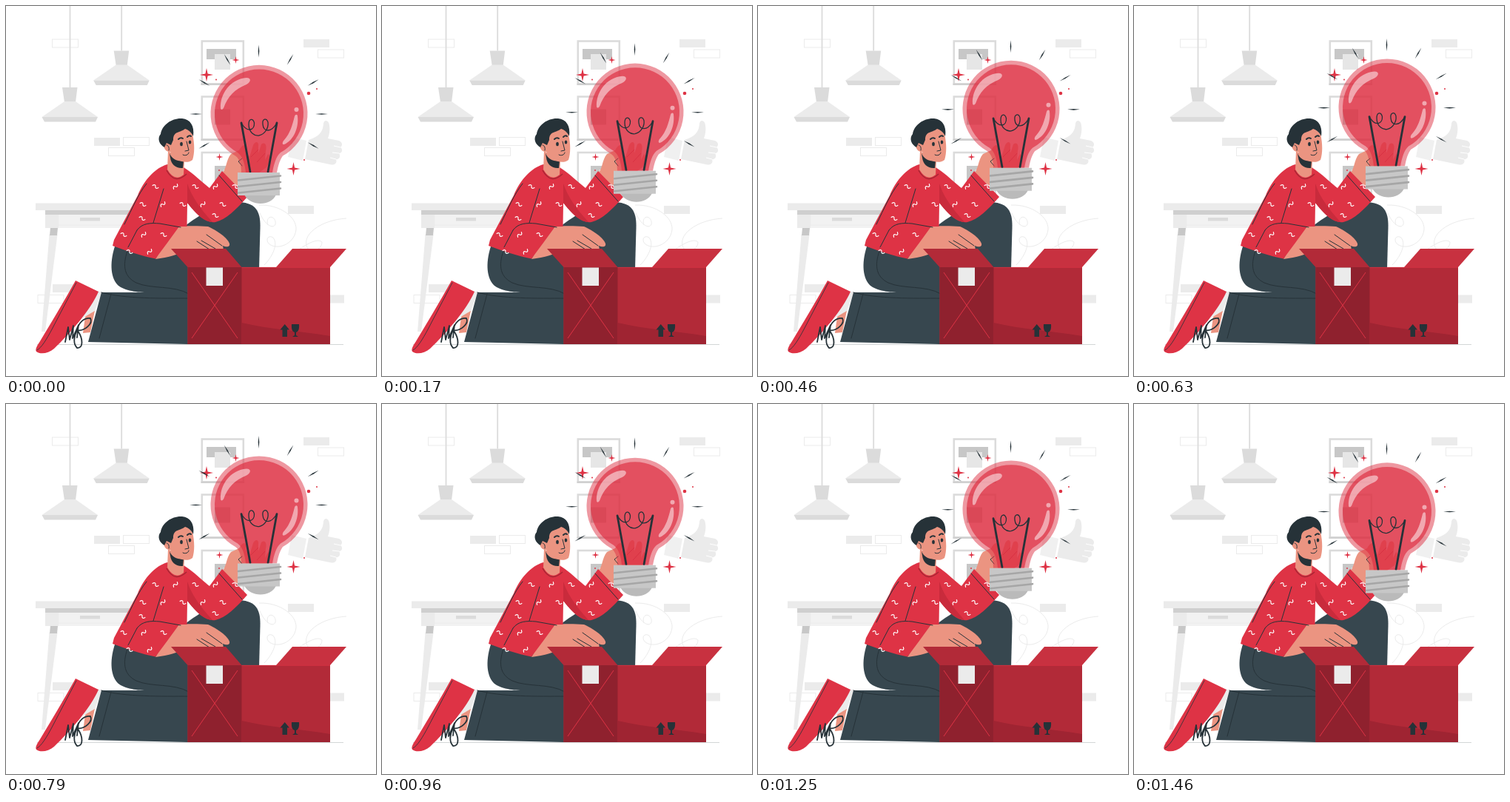
An HTML page that plays this animation: 500x500 px, repeating every 1.5 s.

```html
<!DOCTYPE html>
<html lang="en">
<head>
<meta charset="utf-8">
<title>Idea out of the box</title>
<style>
  html, body { margin: 0; width: 100%; height: 100%; overflow: hidden; background: #fff; }
  svg { display: block; width: 100%; height: 100%; }
  .line { fill: none; stroke: #263238; stroke-linecap: round; stroke-linejoin: round; }
  .ink { fill: #263238; }
  .red { fill: #de3345; }
  .skin { fill: #eb9481; }
  .pants { fill: #37474f; }
  .pale { fill: #ebebeb; }
  .grey { fill: #dbdbdb; }
  .faint { fill: none; stroke: #ebebeb; }
</style>
</head>
<body>
<svg viewBox="0 0 500 500">
  <defs>
    <g id="lamp">
      <path d="M86.500-60V110" stroke="#dbdbdb" stroke-width="1.800"/>
      <path class="grey" d="M76 110H96.500L94 130H79Z"/>
      <path class="pale" d="M79 129H94L124 150H48.500Z"/>
      <path class="grey" d="M48.500 150H124L121 156.500H52Z"/>
    </g>
    <g id="frame">
      <rect x="264.800" y="47.500" width="56" height="58" fill="#fff" stroke="#dbdbdb" stroke-width="2.600"/>
      <path d="M263.500 105.800H322" stroke="#d0d0d0" stroke-width="2.600"/>
    </g>
    <rect id="brick" width="35" height="11"/>
    <path id="star" class="red" d="M0-9L1.600-1.600L9 0L1.600 1.600L0 9L-1.600 1.600L-9 0L-1.600-1.600Z"/>
    <path id="squiggle" fill="none" stroke="#fff" stroke-width="1.200" stroke-linecap="round" d="M-4 1C-3-2-1-2 0 0S3 2 4-1"/>
    <path id="ray" class="ink" d="M0-8.500L.8 0L0 8.500L-.8 0Z"/>
  </defs>

  <!-- Room -->
  <g class="pale">
    <use href="#brick" x="402" y="45"/>
    <use href="#brick" x="119" y="178"/>
    <use href="#brick" x="381" y="270"/>
    <use href="#brick" x="63" y="376"/>
    <use href="#brick" x="422" y="390.500"/>
  </g>
  <g class="faint">
    <use href="#brick" x="62.500" y="45"/>
    <use href="#brick" x="421.500" y="59"/>
    <use href="#brick" x="158.500" y="177.500"/>
    <use href="#brick" x="138.500" y="191.500"/>
    <use href="#brick" x="43" y="390.500"/>
    <path d="M342 269C370 268 393 285 392 302C390 322 366 331 355 321C350 315 355 309 361 313C369 323 358 341 349 350M343 280C353 302 366 301 364 291C361 281 350 285 354 296M460 287C425 289 397 310 408 328C416 334 427 328 427 319C420 312 398 325 374 347"/>
  </g>
  <use href="#lamp"/>
  <use href="#lamp" x="69.700" y="-49.500"/>

  <use href="#frame"/>
  <use href="#frame" y="75"/>
  <use href="#frame" y="150.500"/>
  <path fill="#c7c7c7" d="M271 58H311V72H271ZM282 139.500H303V160.500H282ZM282 216H306V240H282Z"/>
  <path fill="#e6e6e6" d="M282 65H303V86H282ZM294 221H315V240H294Z"/>

  <path fill="#f0f0f0" d="M386 177L406 182L401 209L381 204Z"/>
  <path class="pale" d="M409 181C420 177 428 173 429 159C430 153 436 154 437 161C438 168 437 173 435 179L450 182C455 184 455 189 452 191C456 194 454 199 450 199C453 203 450 208 446 207C448 212 444 215 440 214.500L404 207Z"/>
  <path fill="none" stroke="#fff" d="M443 189L452 191M441 198L450 199M438 205L446 207"/>

  <path class="pale" d="M58.500 309H69.500L53 440H48Z"/>
  <path fill="#f2f2f2" d="M53 282H180V300H53Z"/>
  <path class="pale" d="M40 266.500H190V276H40ZM53 282H71V300H53Z"/>
  <path fill="#cfcfcf" d="M53 276H190V282H53Z"/>
  <path class="grey" d="M100 286H127V290.500H100Z"/>
  <path class="faint" d="M71 282V296H180"/>
  <path fill="#c7c7c7" d="M60 300H70L69 310H59Z"/>
  <path d="M42 457.300H456" stroke="#263238" stroke-width=".5" opacity=".5"/>

  <!-- Legs and shoe -->
  <path class="pants" d="M232 305C262 281 292 262 320 265.500C340 268 344 281 343.500 300L342 356H235Z"/>
  <path class="skin" d="M122 402L114 441L104 442L107 420Z"/>
  <path class="pale" d="M124 385L130 387L120 412L103 422Z"/>
  <path class="red" d="M94 371L125 386C114 411 88 441 65 463C57 470 46 471 41 467C39 464 42 459 46 453C61 428 78 400 94 371Z"/>
  <path class="line" stroke-width=".8" d="M42 465C48 462 55 450 62 437L95 374"/>
  <path class="line" stroke-width="1.800" d="M80 454L84 434L86 451L91 432L90 449L98 431L96 448M96 439C98 427 106 421 114 422C118 429 106 440 96 438C91 447 91 457 96 462C105 463 104 449 97 439"/>
  <path class="pants" d="M148 322C140 345 141 365 150 376C157 384 175 387 190 387H129L111 454L246 457V320Z"/>
  <path class="line" d="M164 331C157 352 160 366 176 374C196 383 227 377 247 389M129 387C160 396 212 395 247 395M142 389L126 449"/>

  <!-- Resting hand -->
  <path class="skin" d="M228 298C246 297 261 297 273 298C285 303 300 314 302 321C303 326 298 326 293 324L294 330H246C233 335 220 340 202 342Z"/>
  <path class="line" d="M258 318L275 329M264 317L283 328M271 309L292 324"/>

  <!-- Raised hand -->
  <path class="skin" d="M290 228C298 223 297 208 304 200L315 195C320 185 326 186 324 197L329 204L334 188C337 182 342 183 341 190L341 199L345 187C350 183 353 188 351 196L350 208L354 200C358 202 356 211 352 218L338 228L318 246Z"/>
  <path class="line" stroke-width=".9" d="M319 206L314 210L319 216"/>
  <path fill="none" stroke="#b22a38" d="M331 204L341 194M339 211L350 199"/>

  <!-- Sweater -->
  <path class="red" d="M218 214C201 219 186 236 178 256L146 316L144 324C160 330 184 338 202 341.500C212 328 224 312 234 298L244.500 298L245 266C256 279 268 294 283 292C297 289 312 274 326 258L292 223L275 246C266 239 253 226 240 218Z"/>
  <path fill="#c92b3c" d="M245 240C251 258 262 273 279 292C265 291 254 277 245 266Z"/>
  <path class="line" d="M213 247L199 293M177 303C184 293 196 293 208 294L236 299M190 240C178 255 171 273 160 295M177 303L165 326M288 229L319 264"/>
  <path class="skin" d="M219 196L218 221Q228 238 240 228L241 209Z"/>
  <path fill="none" stroke="#a82633" stroke-width="1.500" d="M217 222Q228 242 244 227"/>
  <g id="pattern"></g>

  <!-- Head -->
  <path class="ink" d="M221 199C224 207 233 211 240 209L239 219C230 220 223 214 222 205Z"/>
  <path class="skin" d="M215 185C214 169 225 160 242 163L252 173C255 186 255 199 252 208C243 215 227 208 222 197C214 198 211 187 215 185Z"/>
  <path class="ink" d="M214 191C207 187 204 179 209 173C211 160 225 151 238 152C249 153 255 162 253 176C251 171 246 167 242 166C234 172 226 169 226 181L223 188L217 185Z"/>
  <path class="line" d="M217 188C219 188 221 191 220 195M244 183L247 195L242 196M239 201C242 203 247 201 247 198"/>
  <path class="line" stroke-width="2" d="M233 180Q236 177 239 179M245 177Q248 174 250 176"/>
  <ellipse class="ink" cx="237" cy="186.500" rx="1.900" ry="2.700"/>
  <ellipse class="ink" cx="248.500" cy="184" rx="1.800" ry="2.600"/>

  <!-- Box -->
  <path fill="#b22a38" d="M223 328H297L318.500 353H438V457H245.500V353Z"/>
  <path fill="#c83140" d="M387 328H460L438 353H365Z"/>
  <path fill="#8f212e" d="M245.500 353H318.500V457H245.500Z"/>
  <path fill="#9f2432" d="M318.500 428C357 437 395 439 438 446V457H318.500Z"/>
  <path fill="none" stroke="#de3345" d="M251 360L313 449M313 360L251 449"/>
  <path stroke="#de3345" stroke-width=".7" d="M318.500 353.300H438"/>
  <path class="pale" d="M270.500 353.500H293V378H270.500Z"/>
  <path class="ink" d="M376.700 430L383 437.500H380V447H373.500V437.500H370.500ZM386 430H396C396.500 437 395 440 392 441V445L395 447H387L390 445V441C387 440 385.500 437 386 430Z"/>

  <!-- Sparkles -->
  <use href="#star" x="271" y="93"/>
  <use href="#star" x="388.500" y="220"/>
  <use href="#star" transform="translate(310.500 73) scale(.55)"/>
  <use href="#star" transform="translate(288.500 204) scale(.55)"/>
  <g class="red">
    <circle cx="409" cy="118" r="2.300"/>
    <circle cx="420" cy="112" r="1"/>
    <circle cx="284" cy="99.500" r="1"/>
    <circle cx="403" cy="208" r="1"/>
    <circle cx="288" cy="222" r="1"/>
  </g>

  <!-- Light bulb -->
  <g id="bulb">
    <g id="rays"></g>
    <path class="red" opacity=".5" d="M310 202.500A65.500 65.500 0 1 1 374 202.500C370 208 368 215 366 225H318C318 215 316 207 310 202.500Z"/>
    <path class="red" opacity=".7" d="M313 198A60 60 0 1 1 371 198C365 203 362 214 360 225H324C323 214 320 203 313 198Z"/>
    <path class="line" stroke-width="1.300" d="M318 158C326 172 336 168 335.500 158C334 151 328 152 328 160C328 171 336 176 342 175C350 173 355 165 354 157C352 151 346 152 347 160C348 170 358 172 366 158"/>
    <path class="line" stroke-width="2.800" d="M318 158L330 224M366 158L354 224"/>
    <g fill="#fff" opacity=".5">
      <path d="M290 138C289 120 302 99 325 97C332 97 331 103 325 106C308 113 300 122 294 138C292 141 290 140 290 138Z"/>
      <path d="M394 149C396 165 388 182 376 187C373 188 373 184 376 181C384 172 387 161 390 149C391 146 394 146 394 149Z"/>
      <circle cx="392.500" cy="140" r="3"/>
    </g>
    <path fill="#bababa" d="M322 255H365C358 271 330 271 322 255Z"/>
    <path fill="#c7c7c7" d="M313 225H370V256H313Z"/>
    <path fill="none" stroke="#a6a6a6" stroke-width="2.600" stroke-linecap="round" d="M314 235.500L371 229.500M314 244L371 238M314 252.500L371 246.500"/>
  </g>
</svg>
<script>
  const LOOP = 1500, LIFT = 10;
  const $ = id => document.getElementById(id);
  const use = (shape, transform) => `<use href="#${shape}" transform="${transform}"/>`;

  // Sweater rows: start x, y, number of squiggles; neighbours tilt opposite ways.
  const rows = [[202, 244, 5], [185, 268, 5], [184, 287, 1], [283, 283, 1], [159, 309, 3], [167, 332, 2]];
  $('pattern').innerHTML = rows.map(([x, y, count]) =>
    Array.from({ length: count }, (_, i) =>
      use('squiggle', `translate(${x + 27 * i} ${y}) rotate(${i % 2 ? -40 : 35})`)).join('')).join('');

  // Rays fan out every 30 degrees, leaving the base free.
  for (let angle = -120; angle <= 120; angle += 30)
    $('rays').innerHTML += use('ray', `translate(341.5 146) rotate(${angle}) translate(0 -85)`);

  function draw() {
    const phase = performance.now() % LOOP / LOOP;
    const lift = LIFT * (1 - Math.abs(1 - 2 * phase));
    $('bulb').setAttribute('transform', `translate(0 ${-lift})`);
    requestAnimationFrame(draw);
  }
  draw();
</script>
</body>
</html>
```
